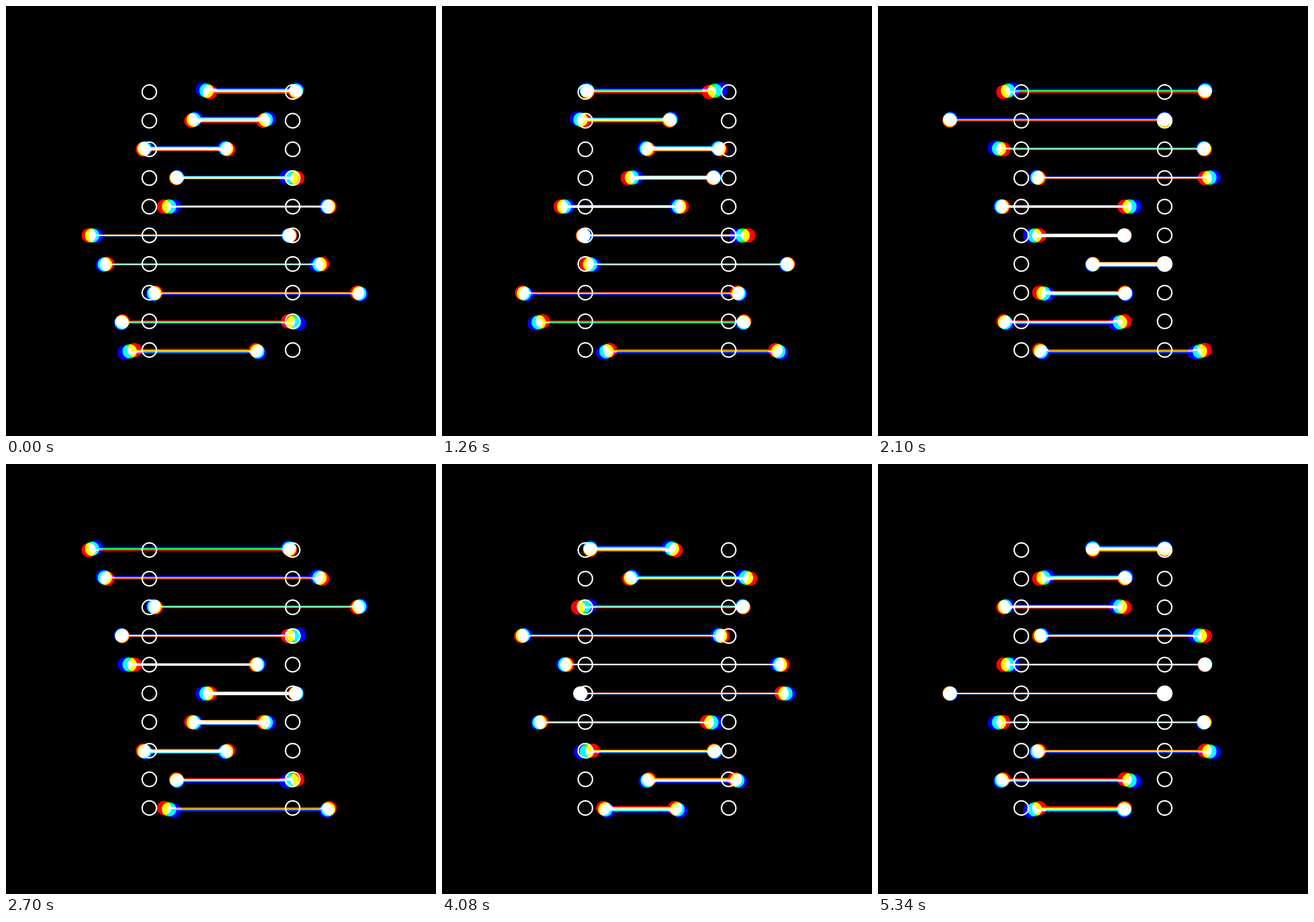
An HTML page with a canvas that plays this animation: 748x748 px, repeating every 5400 ms.

```html
<!DOCTYPE html>
<html lang="en">
<head>
<meta charset="utf-8">
<title>Beat pairs</title>
<style>
  html, body { margin: 0; width: 100%; height: 100%; overflow: hidden; background: #000; }
  canvas { display: block; }
</style>
</head>
<body>
<canvas id="stage" width="748" height="748"></canvas>
<script>
const ctx = document.getElementById('stage').getContext('2d');
const SIZE = 600, STEP = 60, STEPS = 90, ROWS = 10;
const TAU = 2 * Math.PI;
const LEFT = 200, RIGHT = 400, SWING = 100, RADIUS = 10;

// Each colour layer runs slightly ahead and is spread a little further vertically.
const LAYERS = [
  { color: '#f00', lead: 0, spread: 1 },
  { color: '#0f0', lead: 0.15, spread: 1.01 },
  { color: '#00f', lead: 0.3, spread: 1.02 }
];

const rowY = (row, spread = 1) => SIZE / 2 + (row - (ROWS - 1) / 2) * 40 * spread;

function circle(x, y) {
  ctx.beginPath();
  ctx.arc(x, y, RADIUS, 0, TAU);
}

function drawPair(row, step, { color, lead, spread }) {
  const a = TAU * ((step + 1 + lead) / STEPS + row / ROWS);
  const x1 = LEFT + SWING * Math.cos(8 * a) * Math.cos(a);
  const x2 = RIGHT + SWING * Math.sin(8 * a) * Math.sin(a);
  const y = rowY(row, spread);

  ctx.fillStyle = color;
  // The band keeps its area, so it thins as it stretches; one path avoids double blending.
  const thick = 600 / (x2 - x1);
  ctx.beginPath();
  ctx.arc(x1, y, RADIUS, 0, TAU);
  ctx.closePath();
  ctx.moveTo(x2 + RADIUS, y);
  ctx.arc(x2, y, RADIUS, 0, TAU);
  ctx.closePath();
  ctx.rect(x1, y - thick / 2, x2 - x1, thick);
  ctx.fill();
}

function draw(step) {
  ctx.setTransform(1, 0, 0, 1, 0, 0);
  ctx.globalCompositeOperation = 'source-over';
  ctx.fillStyle = '#000';
  ctx.fillRect(0, 0, 748, 748);
  ctx.scale(748 / SIZE, 748 / SIZE);

  ctx.globalCompositeOperation = 'lighter';
  for (const layer of LAYERS) {
    for (let row = 0; row < ROWS; row++) drawPair(row, step, layer);
  }

  ctx.strokeStyle = '#fff';
  ctx.lineWidth = 2;
  for (let row = 0; row < ROWS; row++) {
    for (const x of [LEFT, RIGHT]) {
      circle(x, rowY(row));
      ctx.stroke();
    }
  }
}

function tick(now) {
  draw(Math.floor(now / STEP) % STEPS);
  requestAnimationFrame(tick);
}

draw(0);
requestAnimationFrame(tick);
</script>
</body>
</html>
```
